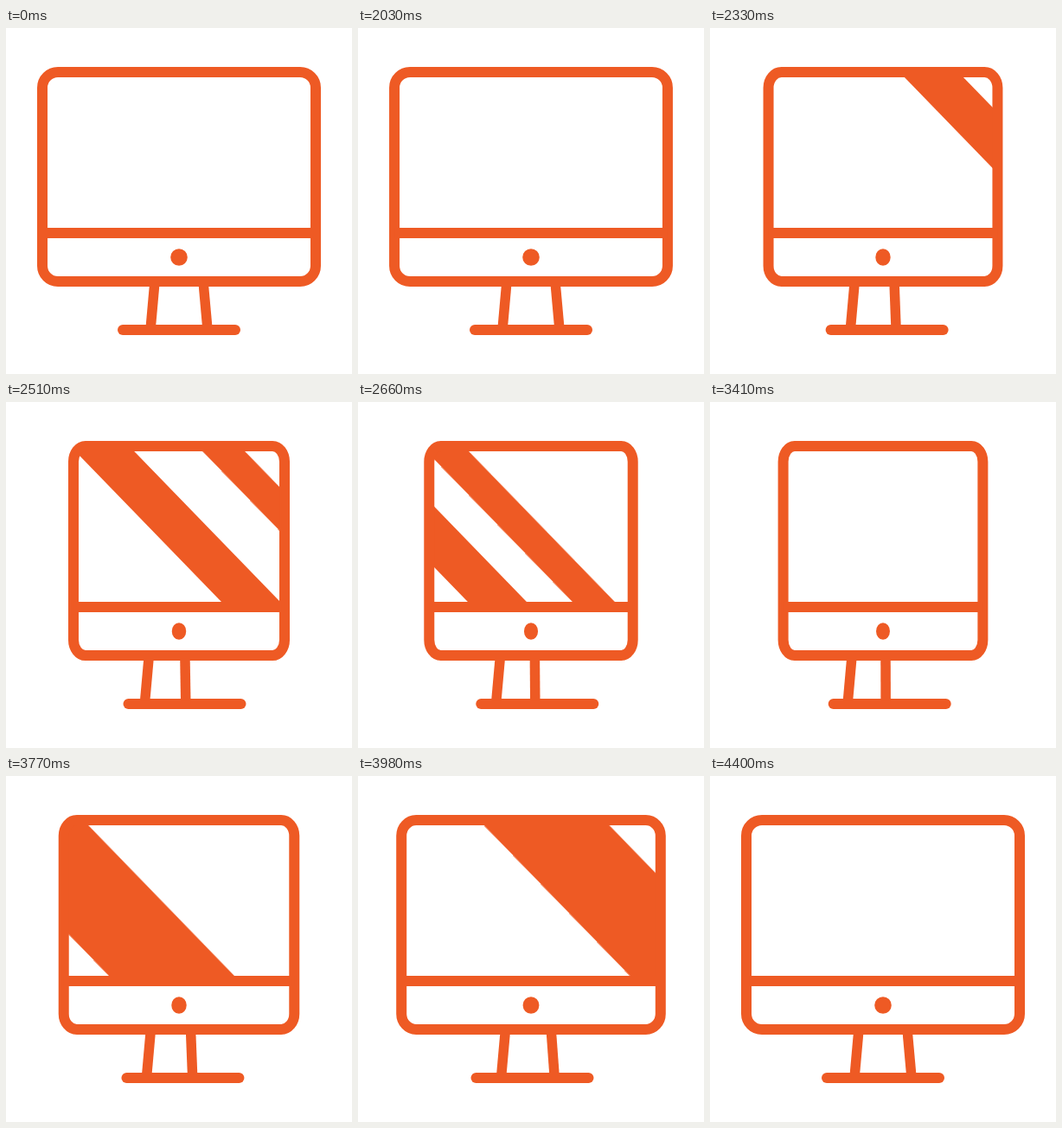
Recreate the animation shown at these times as an HTML page. Size 400 by 400 pixels, loop 4430 ms.

```html
<!DOCTYPE html>
<html lang="en">
<head>
<meta charset="utf-8">
<title>Turning monitor</title>
<style>
  /* 0 = facing front, 1 = fully turned */
  @property --turn {
    syntax: "<number>";
    inherits: true;
    initial-value: 0;
  }
  html, body {
    margin: 0;
    width: 100%;
    height: 100%;
    overflow: hidden;
    background: #fff;
  }
  svg {
    display: block;
    width: 100%;
    height: 100%;
    fill: none;
    stroke: #ee5a24;
    stroke-width: 12;
    animation: turn 4430ms infinite;
  }
  .solid { fill: #ee5a24; stroke: none; }

  .body, .divider {
    x: calc(42px + 44.3px * var(--turn));
    width: calc(316px - 88.6px * var(--turn));
  }
  .body {
    rx: calc(18px - 5px * var(--turn));
    ry: 18px;
  }
  .dot { rx: calc(9.8px - 1.9px * var(--turn)); }
  .left { transform: translateX(calc(-8.2px * var(--turn))); }
  .right {
    transform: translate(calc(228px - 26px * var(--turn)), 293px)
               matrix(1, 0, calc(.09 - .09 * var(--turn)), 1, 0, 0);
  }
  .base { transform: translateX(calc(8px * var(--turn))); }

  .glare rect { animation: 4430ms infinite; }
  .glare .wide { animation-name: wide; }
  .glare .thin { animation-name: thin; }
  .glare .back { animation-name: back; }

  @keyframes turn {
    0% { --turn: 0; }
    45.37% { --turn: 0; animation-timing-function: cubic-bezier(.3, 0, .05, 1); }
    70.54% { --turn: 1; }
    72.01% { --turn: 1; animation-timing-function: cubic-bezier(.61, 0, .41, 1); }
    99.1%, 100% { --turn: 0; }
  }
  @keyframes wide {
    0% { transform: translateX(395px); }
    45.37% { transform: translateX(395px); animation-timing-function: cubic-bezier(.333, 0, .667, 1); }
    67.95%, 100% { transform: translateX(-165px); }
  }
  @keyframes thin {
    0% { transform: translateX(395px); }
    50.56% { transform: translateX(395px); animation-timing-function: cubic-bezier(.333, 0, .667, 1); }
    69.07%, 100% { transform: translateX(-165px); }
  }
  @keyframes back {
    0% { transform: translateX(-200px); }
    76.07% { transform: translateX(-200px); animation-timing-function: cubic-bezier(.333, 0, .667, 1); }
    98.65%, 100% { transform: translateX(430px); }
  }
</style>
</head>
<body>
<svg viewBox="0 0 400 400">
  <clipPath id="screen">
    <rect class="divider" y="51" height="186" rx="13"/>
  </clipPath>
  <g clip-path="url(#screen)">
    <g class="glare solid" transform="translate(0 57) skewX(44.13)">
      <rect class="wide" x="-34" y="-12" width="68" height="198"/>
      <rect class="thin" x="-24.5" y="-12" width="49" height="198"/>
      <rect class="back" x="-72.5" y="-12" width="145" height="198"/>
    </g>
  </g>
  <path class="left" d="M172 293L167 349" stroke-width="11.5"/>
  <path class="right" d="M0 0V56" stroke-width="11.5"/>
  <path class="base" d="M135 349H265" stroke-linecap="round"/>
  <rect class="body" y="51" height="242"/>
  <rect class="divider solid" y="231" height="12"/>
  <ellipse class="dot solid" cx="200" cy="265" ry="9.8"/>
</svg>
</body>
</html>
```
